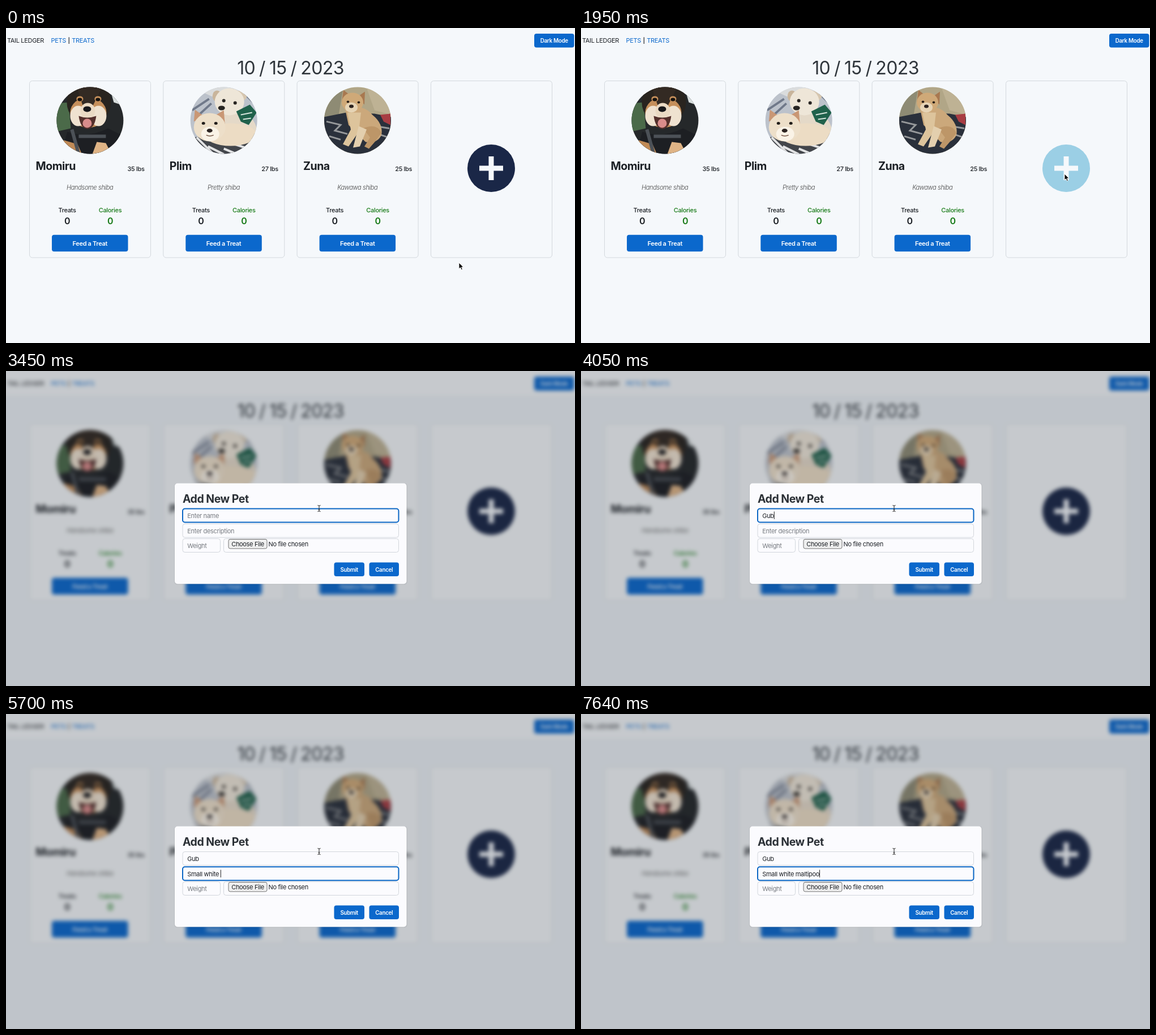
An HTML page that plays this animation: 1005x557 px, repeating every 8000 ms.

```html
<!DOCTYPE html>
<html lang="en">
<head>
<meta charset="utf-8">
<title>Add a pet</title>
<style>
  html, body { margin: 0; width: 100%; height: 100%; overflow: hidden; background: #f5f8fb; }
  svg { display: block; width: 1005px; height: 557px; --bg: #f5f8fb; --panel: #f5f8fb; }
  svg.dim { --bg: #ebf0f4; --panel: #f3f6f8; }
  .dim #page { filter: blur(3.5px); }
  svg:not(.dim) .modal { display: none; }
  text { font: 400 11px Inter, "Open Sans", sans-serif; letter-spacing: -.03em; white-space: pre; fill: #1b1f24; }
  .mid { text-anchor: middle; }
  .end { text-anchor: end; }
  .date { font-size: 32px; letter-spacing: -.02em; word-spacing: -.045em; fill: #2f353b; }
  .title { font-size: 19.5px; font-weight: 700; letter-spacing: -.025em; }
  .heading { fill: #2a2f35; }
  .med { font-weight: 500; }
  .strong { font-weight: 600; }
  .big { font-size: 16px; font-weight: 600; }
  .note { font-style: italic; font-weight: 300; fill: #444; }
  .green { fill: #177a17; }
  .link { fill: #0b68cc; }
  .white { fill: #fff; }
  .small { font-size: 9.8px; font-weight: 600; }
  .hint { fill: #777b80; }
  .field { fill: #fbfbfe; stroke: #d2d6dc; }
  .field.focus { stroke: #0a66c4; stroke-width: 2; }
</style>
</head>
<body>
<svg id="stage" viewBox="0 0 1005 557"></svg>
<script>
const stage = document.getElementById('stage');
const BLUE = '#0b68cc';

const text = (x, y, str, cls = '') => `<text x="${x}" y="${y}" class="${cls}">${str}</text>`;
const rect = (x, y, w, h, r, attrs) => `<rect x="${x}" y="${y}" width="${w}" height="${h}" rx="${r}" ${attrs}/>`;
const oval = (x, y, rx, ry, fill) => `<ellipse cx="${x}" cy="${y}" rx="${rx}" ry="${ry}" fill="${fill}"/>`;
const path = (d, fill) => `<path d="${d}" fill="${fill}"/>`;
const line = (d, color, width) => `<path d="${d}" fill="none" stroke="${color}" stroke-width="${width}"/>`;
const button = (x, y, w, h, label, base, cls) =>
  rect(x, y, w, h, 4, `fill="${BLUE}"`) + text(x + w / 2, base, label, 'mid white ' + cls);
const field = (id, x, y, w) => rect(x, y, w, 24, 4, `id="${id}" class="field"`);

// Simplified portraits, drawn around the centre of a round crop
const portraits = [
  oval(0, 0, 60, 60, '#25282a') +
  path('M-60-30L-38-32-34 14-60 20Z', '#4b6a49') +
  path('M34-60H60V-26L42-32Z', '#d9dfde') +
  oval(-2, -32, 39, 40, '#29241f') +
  oval(-3, -14, 32, 27, '#c58f5b') +
  path('M-24-60H22L4-24H-12Z', '#332a23') +
  oval(-21, -8, 14, 18, '#efe2d0') + oval(15, -8, 14, 18, '#efe2d0') +
  oval(-4, -17, 13, 14, '#eadac4') +
  oval(-18, -38, 6, 5, '#c58f5b') + oval(14, -38, 6, 5, '#c58f5b') +
  oval(-18, -37, 4, 3, '#15120f') + oval(14, -37, 4, 3, '#15120f') +
  oval(-5, -20, 7, 5, '#17171a') +
  path('M-20-8Q-5-2 11-8Q8 15-5 15Q-17 14-20-8Z', '#54302c') + oval(-5, 5, 8, 8, '#d98c8b') +
  path('M-52 60L-40 20Q-5 32 32 14L60 28V60Z', '#1d1f23') +
  path('M-60 60L-46 35-22 42-14 60Z', '#c08a56') +
  path('M4 60L12 38 28 40 38 60Z', '#dfb486') +
  line('M-32 16L-20 60M-20 28H28', '#4c5157', 6),

  oval(0, 0, 60, 60, '#bcc2cb') +
  path('M-60-60H60V-30L20-58-20-42Z', '#dadcdd') +
  line('M-56-18L-26-38M-46-8L-22-30M36-48L60-24', '#70798a', 4) +
  path('M0-10Q55-25 60 25L40 45-10 40Z', '#e4d9c8') +
  oval(-12, -43, 8, 10, '#c9b59b') + oval(32, -45, 9, 10, '#d6c6af') +
  oval(10, -33, 26, 24, '#eee6d8') +
  oval(0, -35, 3, 3, '#282522') + oval(20, -31, 3, 3, '#282522') + oval(-4, -22, 6, 4, '#282522') +
  path('M22-16L46-28 58-14 44 8 30 2Z', '#20614b') +
  line('M30-10L50-14M34-2L48-4', '#d7e4dc', 2) +
  path('M-60 30L60 22V60H-60Z', '#43464b') +
  line('M-48 30L-20 58M-28 46L0 60M0 50L24 60M18 42L44 50M36 30L58 38', '#e2e3e4', 4) +
  oval(12, 25, 46, 20, '#ecdcc4') +
  path('M-53 2L-51-19-34-7Z M-17-8L0-18 2 7Z', '#c99775') +
  oval(-25, 12, 28, 25, '#eddfc9') + oval(-24, 24, 16, 13, '#faf3e7') +
  oval(-36, 5, 3, 2.5, '#211d1a') + oval(-14, 5, 3, 2.5, '#211d1a') + oval(-25, 18, 5, 3.5, '#2c2422') +
  line('M-31 26Q-25 29-18 26', '#77594a', 1.5),

  oval(0, 0, 60, 60, '#b1a687') +
  path('M-60-60H-25L-35 0H-60Z', '#8e8b74') +
  path('M15-60H60V-10L30-18Z', '#beb294') +
  path('M-60-6L-20-14 30-12 60-6V60H-60Z', '#2a303b') +
  line('M-55 2L-30 8-40 18-18 24M32 10L56 14M36 24L54 30M-50 28L-30 34', '#96989a', 3) +
  path('M40-10L58-12V8L46 2Z', '#a83d43') +
  path('M-22-20Q10-30 26-10 46 6 42 26 34 42 14 38L-16 8Z', '#cba87b') +
  path('M10 14Q34 4 42 22L32 36 20 50 12 46 22 30Z', '#bd9668') +
  path('M-18-14L6-14 2 20-16 46-26 42-12 16Z', '#ddc49c') +
  path('M2 10L16 16 4 46-8 48Z', '#e3cfae') +
  path('M-28-32L-25-54-10-42Z M0-42L13-51 12-28Z', '#a87850') +
  oval(-9, -32, 19, 17, '#cfa978') + oval(-11, -23, 11, 9, '#e6d4b5') +
  oval(-17, -33, 2.3, 2, '#251c15') + oval(2, -32, 2.3, 2, '#251c15') + oval(-11, -25, 4, 3, '#2a211e')
];

const pets = [['Momiru', 35, 'Handsome'], ['Plim', 27, 'Pretty'], ['Zuna', 25, 'Kawawa']];
const frame = rect(.5, .5, 214, 312.5, 5, 'fill="var(--panel)" stroke="#d3d8dd"');

const card = ([name, weight, mood], i) => `<g transform="translate(${41 + 236.3 * i} 93)">${frame}
  <g transform="translate(107.4 70.4)" clip-path="url(#round)">${portraits[i]}</g>
  ${text(11.5, 158, name, 'title')}${text(203.5, 160, weight + ' lbs', 'end med')}
  ${text(107.2, 193, mood + ' shiba', 'mid note')}
  ${text(67, 232.5, 'Treats', 'mid med')}${text(143, 232.5, 'Calories', 'mid med green')}
  ${text(67, 253.5, 0, 'mid big')}${text(143, 253.5, 0, 'mid big green')}
  ${button(40, 272.7, 134.5, 29.5, 'Feed a Treat', 291.5, 'strong')}</g>`;

stage.innerHTML = `
<defs><clipPath id="round"><circle r="59"/></clipPath></defs>
<g id="page">
  ${rect(-30, -30, 1065, 617, 0, 'fill="var(--bg)"')}
  ${rect(-30, -30, 1065, 73, 0, 'fill="var(--panel)"')}
  ${text(2, 26, 'TAIL LEDGER')}${text(79.5, 26, 'PETS', 'link')}
  ${text(111, 25.5, '|', 'mid small')}${text(116.3, 26, 'TREATS', 'link')}
  ${button(933, 10, 70.5, 24.5, 'Dark Mode', 25.7, 'small')}
  ${text(502.5, 82, '10 / 15 / 2023', 'mid date')}
  ${pets.map(card).join('')}
  <g transform="translate(750 93)">${frame}</g>
  <circle id="add" cx="857" cy="248" r="42"/>
  ${line('M836 248H878M857 227V269', '#f5f8fb', 9)}
</g>
<g class="modal">
  ${rect(0, 0, 1005, 557, 0, 'fill="#20242a" fill-opacity=".21"')}
  ${rect(297, 198, 412, 180, 6, 'fill="#000" fill-opacity=".06"')}
  ${rect(298, 198.5, 409.5, 178, 5, 'fill="#fbfbfe"')}
  ${text(312, 233, 'Add New Pet', 'title heading')}
  ${field('nameBox', 312, 243.5, 381.5)}${field('noteBox', 312, 270.3, 381.5)}
  ${field('', 312, 296.5, 66.5)}${field('', 384.5, 296.5, 309)}
  <text id="nameText" x="320.3" y="259.7"/><text id="noteText" x="320.3" y="286.5"/>
  ${text(320.3, 313, 'Weight', 'hint')}
  ${rect(393, 297.5, 68, 16.5, 3, 'fill="#efefef" stroke="#737373"')}
  ${text(427, 310, 'Choose File', 'mid')}${text(463.5, 310, 'No file chosen')}
  ${button(579.5, 338.5, 53.5, 24.5, 'Submit', 354.5, 'small')}
  ${button(641.5, 338.5, 52.5, 24.5, 'Cancel', 354.5, 'small')}
  <rect id="caret" width="1" height="13.5" fill="#222"/>
</g>
<g id="cursor">
  <path id="arrow" d="M0 0V11L2.6 8.6 4.3 12.6 6.3 11.7 4.6 7.9H8Z" fill="#000" stroke="#fff" stroke-width=".9"/>
  <path id="beam" d="M-2.5-5.5Q0-5.5 0-4V4Q0 5.5-2.5 5.5M2.5-5.5Q0-5.5 0-4M0 4Q0 5.5 2.5 5.5M-1.5 2H1.5" fill="none" stroke="#222"/>
</g>`;

const [add, nameBox, noteBox, nameText, noteText, caret, cursor, arrow, beam] =
  'add nameBox noteBox nameText noteText caret cursor arrow beam'.split(' ').map(id => document.getElementById(id));

const nameKeys = [[3750, 'G'], [3900, 'Gu'], [4050, 'Gub']];
const noteKeys = [
  [4650, 'S'], [4800, 'Sma'], [4950, 'Small'], [5100, 'Small '],
  [5400, 'Small wh'], [5550, 'Small whit'], [5700, 'Small white '], [6000, 'Small white m'],
  [6300, 'Small white '], [6450, 'Small white m'], [6600, 'Small white ma'], [6750, 'Small white mal'],
  [6900, 'Small white malt'], [7040, 'Small white malti'], [7190, 'Small white maltip'],
  [7490, 'Small white maltipo'], [7640, 'Small white maltipoo']
];
const typed = (keys, t) => keys.reduce((now, [at, str]) => t >= at ? str : now, '');

// Eased progress that advances in 150 ms ticks
function glide(t, start, ticks) {
  const p = Math.max(0, Math.min(1, (Math.floor((t - start) / 150) + 1) / ticks));
  return p * p * (3 - 2 * p);
}

function fill(node, value, hint) {
  node.textContent = value || hint;
  node.setAttribute('class', value ? '' : 'hint');
}

function draw(t) {
  const open = t >= 2100, inNote = t >= 4200;
  const go = glide(t, 600, 6), back = glide(t, 2250, 3);
  const x = 800 + 54 * go - 301 * back, y = 415 - 157 * go - 15 * back;
  const hover = !open && Math.hypot(x - 857, y - 248) < 42;

  stage.classList.toggle('dim', open);
  add.setAttribute('fill', hover ? '#9bcfe5' : '#1a2747');
  cursor.setAttribute('transform', `translate(${x} ${y})`);
  arrow.style.display = back < 1 ? '' : 'none';
  beam.style.display = back < 1 ? 'none' : '';
  if (!open) return;

  const name = typed(nameKeys, t), note = typed(noteKeys, t);
  fill(nameText, name, 'Enter name');
  fill(noteText, note, 'Enter description');
  nameBox.classList.toggle('focus', !inNote);
  noteBox.classList.toggle('focus', inNote);

  const value = inNote ? note : name;
  const width = value ? (inNote ? noteText : nameText).getComputedTextLength() : 0;
  const off = (t >= 2550 && t < 3000) || (t >= 3450 && t < 3750);
  caret.setAttribute('x', 320.3 + width);
  caret.setAttribute('y', inNote ? 275.5 : 248.5);
  caret.style.display = off ? 'none' : '';
}

const start = performance.now();
function tick() {
  draw((performance.now() - start) % 8000);
  requestAnimationFrame(tick);
}
tick();
</script>
</body>
</html>
```
